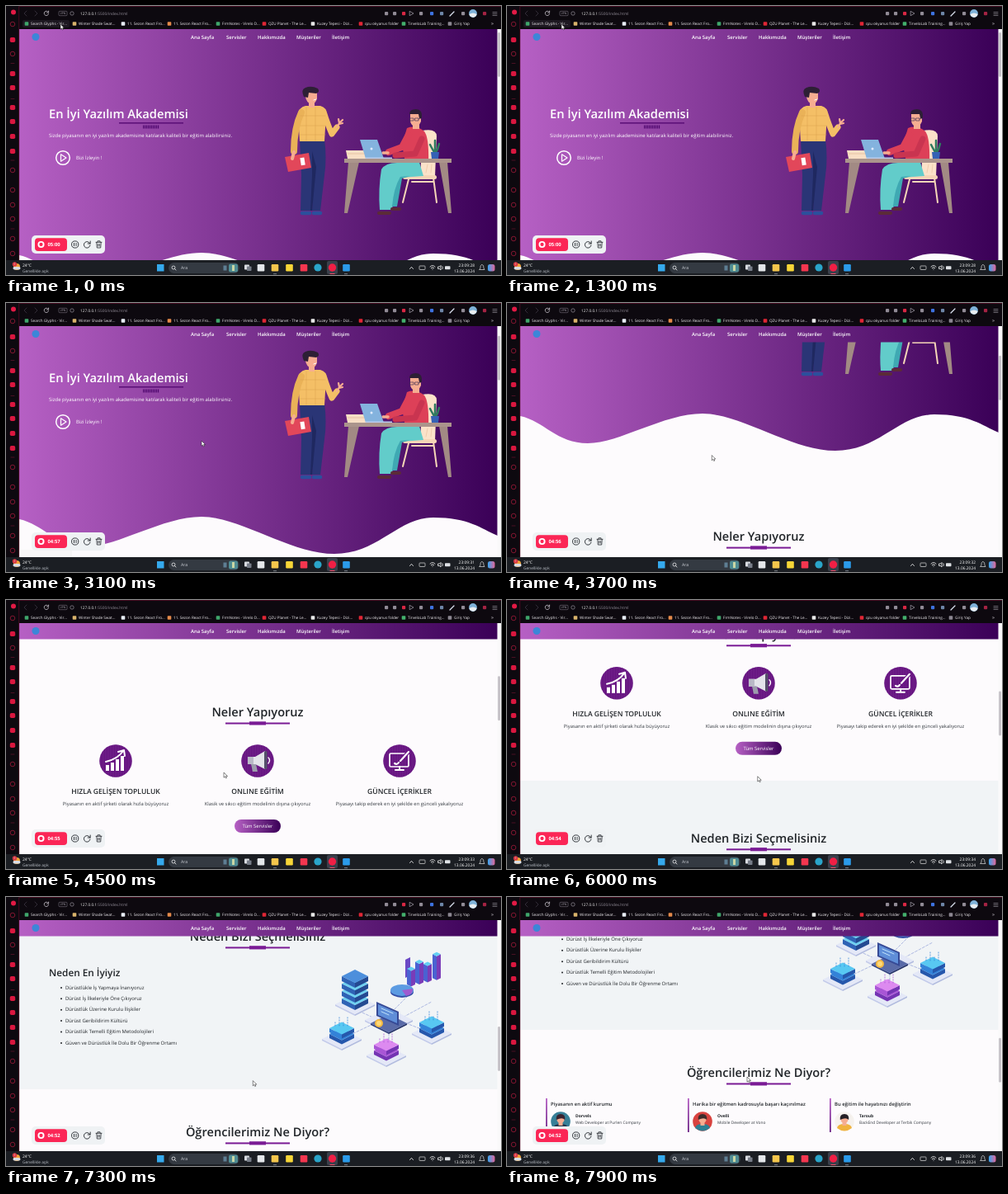
Recreate the animation shown at these times as an HTML page. Size 600 px wide and 326 px high, loop 8 s.

```html
<!DOCTYPE html>
<html lang="tr">
<head>
<meta charset="utf-8">
<style>
html, body { margin: 0; width: 100%; height: 100%; overflow: hidden; background: #fdfbfd }
svg { display: block; width: 100%; height: 100%; font-family: "Open Sans", "Noto Sans", sans-serif; text-rendering: geometricPrecision }
</style>
</head>
<body>
<svg id="stage" viewBox="0 0 600 326"></svg>
<script>
// Drawing helpers: each returns SVG markup
const text = (x, y, size, str, fill = '#fff', extra = '') =>
  `<text x="${x}" y="${y + size * .36}" font-size="${size}" fill="${fill}" ${extra}>${str}</text>`;
const rect = (x, y, w, h, fill, r = 0, extra = '') =>
  `<rect x="${x}" y="${y}" width="${w}" height="${h}" rx="${r}" fill="${fill}" ${extra}/>`;
const dot = (x, y, r, fill, extra = '') => `<circle cx="${x}" cy="${y}" r="${r}" fill="${fill}" ${extra}/>`;
const shape = (d, fill) => `<path d="${d}" fill="${fill}"/>`;
const line = (d, stroke, width = 1, extra = '') =>
  `<path d="${d}" fill="none" stroke="${stroke}" stroke-width="${width}" stroke-linecap="round" stroke-linejoin="round" ${extra}/>`;
const at = (x, y, body) => `<g transform="translate(${x} ${y})">${body}</g>`;
const mid = 'text-anchor="middle"', semi = 'font-weight="600"';
const ink = '#212529', violet = '#7a1b95', skin = '#f6ad91', hair = '#2d1f35';

const heading = (y, str) => text(305, y, 14.6, str, ink, `${mid} ${semi}`) +
  rect(266, y + 12.5, 78, 2, violet) + rect(295, y + 11.3, 20, 4.2, violet);

const standingMan = () =>
  shape('M356 161H386Q389 185 386 205L381 248H371L373 200L370 248H357L358 205Z', '#2a3576') +
  shape('M371 176L376 195L371 248L369 248L371 205Z', '#1f2860') +
  line('M359 251H368M373 251H381', '#2c4f9c', 4.5) +
  shape('M363 121Q355 122 354 133L356 164H386L388 131Q389 123 381 121Z', '#f4bf66') +
  line('M358 129Q349 148 349 176', '#eab258', 8) +
  line('M385 128Q390 144 395 155L401 147', '#f4bf66', 7) + line('M401 147L404 142L408 138M404 142L403 137M404 143L408 142', skin, 2.2) +
  line('M357 133H387M357 145H387M357 156H387M364 123V163M375 123V163', '#d79b4b', .4) +
  rect(367, 112, 7, 11, skin) + shape('M363 103H377V112Q375 119 370 119Q364 117 363 110Z', skin) +
  shape('M361 110Q357 101 363 99Q370 96 378 100Q381 104 376 106L367 105L366 111Z', hair) +
  line('M373 114L376 113', '#fff', 1) +
  shape('M338 183L367 178L370 196L342 201Z', '#e2475a') + rect(357, 184, 5, 9, '#fff', 0, 'transform="rotate(-9 359 188)"') +
  line('M349 177L347 185', skin, 4);

const sittingMan = () =>
  line('M488 210L481 238M518 208L522 238M492 213H518', '#f5d5b7', 2) +
  shape('M505 151Q522 148 522 158L520 207L502 207Z', '#fbe2c9') + line('M511 192L509 202M516 192L515 202', '#ecc7a6', .8) +
  rect(481, 205, 41, 5, '#f5d5b7', 2.5) +
  shape('M500 186L506 206L478 208Q470 228 468 247H453Q451 222 455 198Q460 190 474 190Z', '#62ccca') +
  shape('M490 206L480 209Q476 232 474 243H468Q470 220 478 207Z', '#3fa9b3') +
  line('M452 251H465M468 246H477', '#5b2b38', 4) +
  shape('M486 148Q496 144 506 151Q513 157 512 190H484L480 168Z', '#dd4058') +
  line('M488 156L480 171L464 177', '#dd4058', 8) + line('M504 161L496 179L472 181', '#c93450', 7) +
  line('M457 178L463 178', skin, 3.5) +
  rect(493, 139, 8, 10, skin) + shape('M490 130H503V140Q500 147 495 146Q490 144 490 138Z', skin) +
  shape('M489 131Q489 125 497 125Q505 125 504 136L501 136L500 131Z', hair) +
  line('M490 136H494V139H490ZM496 136H500V139H496ZM500 137L503 136', '#423052', .7) +
  line('M520 179Q516 172 514 168M520 179V163M520 179Q524 173 525 167', '#2f7a5f', 2.5) + shape('M515 177H525L524 185H516Z', '#3561b5') +
  shape('M412 175H440L444 185H414Z', '#f8dfc5') + line('M414 179H441', '#deb994', .7) +
  shape('M429 162H450L458 185H436Z', '#84b3de') + rect(436, 183.5, 32, 1.8, '#b9cbed') + dot(443, 173, 1.5, '#dfeaff') +
  shape('M415 189H428L414 251H410ZM525 189H535L540 251H536Z', '#a28a84') +
  rect(410, 185, 130, 5, '#ab948c');

const hero = () =>
  rect(16, 28, 580, 325, 'url(#brand)') + standingMan() + sittingMan() +
  text(52, 131, 14.7, 'En İyi Yazılım Akademisi', '#fff', semi) +
  rect(137, 141, 78, 1.6, '#5d1179') + rect(166, 144.5, 20, 4, 'url(#hatch)') +
  text(52, 157, 5.95, 'Sizde piyasanın en iyi yazılım akademisine katılarak kaliteli bir eğitim alabilirsiniz.') +
  dot(69, 184, 8.3, 'none', 'stroke="#fff" stroke-width="1.5"') + line('M66.5 179.8L73 184L66.5 188.2Z', '#fff', 1.2) +
  text(85, 184, 5.9, 'Bizi İzleyin !') +
  shape('M16 302C45 308 60 335 98 335S190 299 237 299S345 344 398 344S475 300 518 300S575 313 596 322V355H16Z', '#fdfbfd');

const service = (x, title, info, icon) => at(x, 507,
  dot(0, 0, 19.7, '#691583') + dot(0, 0, 19.7, 'url(#hatch)', 'opacity=".35"') + icon +
  text(0, 37, 8.6, title, ink, `${mid} ${semi}`) + text(0, 52, 5.85, info, '#343a40', mid));

const services = () => heading(448, 'Neler Yapıyoruz') +
  service(133, 'HIZLA GELİŞEN TOPLULUK', 'Piyasanın en aktif şirketi olarak hızla büyüyoruz',
    rect(-12, 5, 4, 7, '#fff') + rect(-6, 2, 4, 10, '#fff') + rect(0, -2, 4, 14, '#fff') + rect(6, -6, 4, 18, '#fff') +
    line('M-12 1Q2 -2 9 -12M3 -11L10 -13L11 -6', '#fff', 2)) +
  service(305, 'ONLINE EĞİTİM', 'Klasik ve sıkıcı eğitim modelinin dışına çıkıyoruz',
    shape('M-12 -5L-3 -5L9 -12V10L-3 4H-12Z', '#e4e4ea') + shape('M-8 4H-2L0 13H-6Z', '#9c9cac') +
    shape('M-12 -5H-5V4H-12Z', '#b9b9c6') + rect(8, -12, 3.5, 22, '#55506a', 1.5) + line('M13 -4Q16 -1 13 3', '#fff', 1.4)) +
  service(477, 'GÜNCEL İÇERİKLER', 'Piyasayı takip ederek en iyi şekilde en günceli yakalıyoruz',
    rect(-12, -9, 23, 16, 'none', 1.5, 'stroke="#fff" stroke-width="1.7"') + line('M-5 11H5M0 7V11', '#fff', 2) +
    line('M11 -11L1 0', '#691583', 4.5) + line('M11 -11L1 0M-1 2Q-3 5 -6 3', '#fff', 2.2)) +
  rect(277, 578, 56, 16, 'url(#brand2)', 8) + text(305, 586, 5.9, 'Tüm Servisler', '#fff', mid);

// Isometric diamond slab of half width w and height h
const slab = (x, y, w, h, top, side, dark) => at(x, y,
  shape(`M${-w} 0L0 ${w / 2}V${w / 2 + h}L${-w} ${h}Z`, side) + shape(`M${w} 0L0 ${w / 2}V${w / 2 + h}L${w} ${h}Z`, dark) +
  shape(`M${-w} 0L0 ${-w / 2}L${w} 0L0 ${w / 2}Z`, top));
const base = (x, y, w = 24) => slab(x, y, w, 2, '#e4e8f7', '#c3cbea', '#b2bcdf');
const chip = (x, y, top, side, dark) => base(x, y + 8) + slab(x, y + 2, 15, 5, side, dark, dark) + slab(x, y - 5, 15, 5, top, side, dark) +
  [-8, -3, 2, 7].map((dx, i) => line(`M${x + dx} ${y - 8}V${y - 14 - i % 2 * 5}`, side, .8, 'stroke-dasharray="1 2"')).join('');
const blue = ['#58c8f2', '#3382d8', '#2657ac'];

const network = () =>
  line('M423 783L464 802L516 774M407 819L464 792L516 812M464 802V836M464 790L490 764', '#aeb9e2', 1, 'stroke-dasharray="3 2"') +
  base(423, 777) + [770, 761, 752, 743].map(y => slab(423, y, 16, 6, y < 745 ? '#4d8fdc' : '#6fd0f0', '#2f63b5', '#244a92')).join('') +
  at(485, 732, shape('M-1 -9L5 -12V10L-1 13Z', '#6b49c5') + [[0, 15], [10, 21], [20, 16], [31, 25]].map(([x, h]) =>
    slab(x + 6, 17 - x / 4 - h, 5, h + 4, '#62d0f3', '#4a62d2', '#7a3cb8')).join('')) +
  at(480, 762, `<ellipse rx="14" ry="7" fill="#3550a8"/><ellipse cy="-2" rx="14" ry="7" fill="#5c9be2"/>` + shape('M0 -2L13 -4Q14 3 5 5Z', '#9e5bd0')) +
  base(464, 796, 29) + slab(464, 800, 22, 2, '#5a6ba8', '#31427d', '#283568') +
  shape('M449 774L476 786V803L449 791Z', '#364a96') + shape('M451 777L474 787V800L451 790Z', '#5f8ed8') +
  line('M455 782L469 788M455 786L464 790', '#bfe3fb', 1) + dot(452, 800, 5, '#f4b942') + dot(452, 800, 3, '#ffd978') +
  chip(407, 811, ...blue) + chip(516, 804, ...blue) + chip(461, 831, '#dd8af0', '#a956d6', '#7434b3');

const why = () => rect(16, 625, 580, 255, '#f1f4f6') + heading(695, 'Neden Bizi Seçmelisiniz') +
  text(52, 739, 11.8, 'Neden En İyiyiz', ink, semi) +
  ['Dürüstlükle İş Yapmaya İnanıyoruz', 'Dürüst İş İlkeleriyle Öne Çıkıyoruz', 'Dürüstlük Üzerine Kurulu İlişkiler',
    'Dürüst Geribildirim Kültürü', 'Dürüstlük Temelli Eğitim Metodolojileri', 'Güven ve Dürüstlük İle Dolu Bir Öğrenme Ortamı']
    .map((s, i) => dot(67, 757 + i * 13.4, 1, ink) + text(72, 756.5 + i * 13.4, 5.95, s, ink)).join('') + network();

const quote = (x, title, name, job, back, shirt, hairColor) => at(x, 963,
  rect(0, 0, 1.8, 41, 'url(#brandV)') + text(6, 6.5, 5.9, title, ink, semi) +
  dot(18, 28, 11.8, back) + shape('M9 36Q10 31 18 31T27 36Q18 43 9 36Z', shirt) + rect(15.5, 28, 5, 5, skin) +
  dot(18, 25.5, 4.6, skin) + shape('M12.8 26Q12 19 18 19T23.2 26Q20 22.5 12.8 26Z', hairColor) +
  text(36, 21.5, 5, name, ink, 'font-weight="700"') + text(36, 29.5, 4.85, job, '#343a40'));

const quotes = () => heading(932, 'Öğrencilerimiz Ne Diyor?') +
  quote(47, 'Piyasanın en aktif kurumu', 'Dorvels', 'Web Developer at Purlen Company', '#377f97', '#24364e', '#3a2430') +
  quote(219, 'Harika bir eğitmen kadrosuyla başarı kaçınılmaz', 'Ovelli', 'Mobile Developer at Vono', '#d8433f', '#2e7f93', '#3e2b2b') +
  quote(391, 'Bu eğitim ile hayatınızı değiştirin', 'Taroub', 'BackEnd Developer at Terbik Company', '#f6f2ee', '#f0b33f', '#252026');

const navbar = () => rect(16, 28, 580, 19.5, 'url(#brand)') + dot(36, 37.5, 4.5, '#3c86d8') +
  [[224, 'Ana Sayfa'], [267, 'Servisler'], [305, 'Hakkımızda'], [352, 'Müşteriler'], [395, 'İletişim']]
    .map(([x, s]) => text(x, 38, 5.95, s, '#fff', semi)).join('');

const bookmarks = [[25, 'Search Glyphs - Vir...', '#3fa66b'], [83, 'Winter Shade Swat...', '#d9b36b'], [142, '11. Sezon React Fro...', '#e8edf5'],
  [198, '11. Sezon React Fro...', '#e58a4a'], [257, 'FrmNotes - Virelo D...', '#3fa66b'], [313, 'QZU Planet - The Le...', '#e02635'],
  [372, 'Kuzey Tepesi - Dizi...', '#e8e8e8'], [430, 'qzu okyanus folder', '#e02635'], [482, 'TirveloLab Training...', '#43b06c'], [538, 'Giriş Yap', '#8c8792']];

const browser = () => rect(0, 0, 600, 28, '#0d090f') + rect(0, 0, 16, 308, '#0d090f') +
  line('M15.7 308V.5H600', '#5c0c27', .7) +
  line('M25 6L22 9L25 12M35 6L38 9L35 12', '#3d3743', .8) + line('M51.3 7.5A2.7 2.7 0 1 0 51.6 9.5M51.6 6V8H49.6', '#c9c4cd', .8) +
  rect(64, 6.3, 10, 5.4, 'none', 1, 'stroke="#8b8590" stroke-width=".5"') + text(69, 9, 3.4, 'VPN', '#aaa4af', mid) +
  dot(80, 9, 2.2, 'none', 'stroke="#aaa4af" stroke-width=".6"') +
  text(90, 9, 4.75, '127.0.0.1<tspan fill="#918b96">:5500/index.html</tspan>', '#eee') +
  [[461, '#918b96'], [471, '#918b96'], [482, '#d92743'], [503, '#918b96'], [516, '#3d72e0'], [528, '#6e86a8'], [554, '#918b96'], [580, '#a52343']]
    .map(([x, c]) => rect(x - 2, 7, 4.2, 4.2, c, 1)).join('') +
  line('M489.5 6.5L494 9L489.5 11.5Z', '#aaa4af', .7) + line('M538 12L543 7', '#d9e0ee', 1.3) + line('M590 7.5H595M590 9.5H595M590 11.5H595', '#aaa4af', .6) +
  dot(566, 9, 4.9, '#7fb2d8') + shape('M561.5 10Q566 7 570.6 10Q569 14 566 13.7Q562 13 561.5 10Z', '#e9edf0') +
  rect(20, 17, 57, 9, '#1d1821', 2, 'id="hover"') +
  bookmarks.map(([x, s, c]) => rect(x - 2.3, 19.2, 4.6, 4.6, c, .8) + text(x + 5, 21.5, 4.65, s, '#f4f1f5')).join('') +
  text(588, 21, 6, '»', '#c9c4cd') +
  [[22, 0], [41, 1], [58, 0], [82, 1], [99, 1], [123, 1], [140, 1], [158, 1], [176, 1], [199, 0], [223, 0], [241, 0], [258, 0], [282, 0], [300, 0]]
    .map(([y, solid]) => solid ? rect(4.8, y - 3, 6.4, 6, '#d9173f', 1.8) : dot(8, y, 2.8, 'none', 'stroke="#8f1835" stroke-width=".9"')).join('') +
  dot(9, 7.5, 3, '#e21a45') + line('M6 69.5H10M6 112.5H10M6 187H10M6 270H10', '#5a1229', .8);

const recorder = () => rect(31, 278, 89, 22, '#eff2f4', 5) + rect(35, 281.3, 39, 15.6, '#fb2656', 4) +
  dot(42.5, 289, 3.1, 'none', 'stroke="#fff" stroke-width="1.9"') +
  text(50.5, 289, 5.9, '', '#fff', 'id="timer" font-weight="700"') +
  dot(83.7, 289, 4.1, 'none', 'stroke="#20242a" stroke-width=".9"') + line('M82.5 287.4V290.6M85 287.4V290.6', '#20242a', .9) +
  line('M101.8 288A3.8 3.8 0 1 0 102 290M102.2 285V288H99.2', '#20242a', .9) +
  line('M109 286.3H116M111 286V284.8H114V286M109.8 286.5L110.3 293H114.7L115.2 286.5M111.7 288.5V291M113.3 288.5V291', '#20242a', .8);

const taskbar = () => rect(0, 308, 600, 18, '#1b1e23') +
  dot(13, 316, 4, '#f0a43a') + rect(8.5, 316, 9, 3.5, '#d8dde5', 1.7) + dot(10.5, 313, 2.7, '#d83a46') + text(10.5, 313, 3.5, '1', '#fff', mid) +
  text(20, 314, 5, '24°C') + text(20, 320.8, 4.8, 'Genellikle açık', '#bfc4cc') +
  rect(183, 313, 8.5, 8.5, '#35a9ec') +
  rect(197, 311, 86, 13, '#343a42', 6.5) + dot(203, 317, 2, 'none', 'stroke="#fff" stroke-width=".7"') + line('M204.6 318.6L206 320', '#fff', .8) +
  text(212, 317.5, 5.2, 'Ara', '#c9cdd4') + rect(270, 312.5, 11, 10, '#4f8c93', 2) + rect(274, 314, 3, 7, '#c9d6a4') + rect(263.5, 314.5, 4, 6, '#5e7e93') +
  rect(289, 313.5, 6, 6, '#d8dbe0', .8) + rect(292, 315.5, 5.5, 5.5, '#777d88', .8) +
  [[309, '#e4e7ea'], [326, '#f5c64c'], [343.5, '#f7d637'], [361, '#f4364f'], [412.5, '#2b9bea']].map(([x, c]) => rect(x - 4.3, 313, 8.6, 8.4, c, 1.2)).join('') +
  dot(378, 317, 4.6, '#2aa5c9') + rect(389, 309, 13, 16, '#3a404b', 2) + dot(395.5, 317, 4.7, '#f01f45') +
  rect(392.5, 324, 6, 1, '#f04a68') + rect(324, 324.3, 4, .8, '#8a919c') + rect(410, 324.3, 4, .8, '#8a919c') +
  line('M489.5 318.5L491.5 316.3L493.5 318.5', '#fff', .8) + rect(501, 315, 7, 4.5, 'none', .8, 'stroke="#ddd" stroke-width=".7"') +
  line('M514 316Q517 313 520 316M515.3 317.6Q517 316 518.7 317.6M517 319.2V319.3M524 316H525.5L527 314.5V320L525.5 318.5H524ZM529 315.7Q530 317.2 529 318.7', '#fff', .8) +
  rect(532, 315.2, 6.5, 4, '#dfe2e6', .8) +
  text(568, 314, 4.9, '', '#fff', 'id="clock" text-anchor="end"') + text(568, 320.8, 4.9, '13.06.2024', '#fff', 'text-anchor="end"') +
  line('M574 319.5H580L579 317.5Q579.2 313.5 577 313.5T575 317.5Z', '#ddd', .7) + rect(584, 313, 8.5, 8.5, 'url(#assist)', 2.5);

const gradient = (id, from, to, dir = '') =>
  `<linearGradient id="${id}" ${dir}><stop stop-color="${from}"/><stop offset="1" stop-color="${to}"/></linearGradient>`;

const stage = document.getElementById('stage');
stage.innerHTML = `<defs>
  ${gradient('brand', '#b660c4', '#3a0057', 'gradientUnits="userSpaceOnUse" x1="16" x2="596"')}
  ${gradient('brand2', '#b660c4', '#3a0057')}
  ${gradient('brandV', '#b660c4', '#6a2184', 'x2="0" y2="1"')}
  ${gradient('assist', '#38a6f0', '#e2679b')}
  <pattern id="hatch" width="2" height="2" patternUnits="userSpaceOnUse">${rect(0, 0, 2, 2, '#8d3ca5') + rect(0, 0, 1.1, 2, '#4f0a6c')}</pattern>
  <clipPath id="view">${rect(16, 28, 584, 280, '#000')}</clipPath></defs>
  <g clip-path="url(#view)">${rect(16, 28, 584, 280, '#fdfbfd')}
    <g id="page">${hero() + services() + why() + quotes()}</g>
    ${navbar() + rect(595.5, 28, 4.5, 280, '#faf9fa') + rect(596.2, 32, 2.8, 54, '#c4c0c6', 1.4, 'id="thumb"')}
  </g>` + browser() + rect(16, 299, 64, 9, '#eee', 0, 'id="status" opacity=".4"') + recorder() + taskbar() +
  `<path id="cursor" d="M0 0V6.2L1.5 4.9L2.5 7L3.5 6.5L2.6 4.5H4.5Z" fill="#fff" stroke="#111" stroke-width=".5"/>`;

// Keyframes are [time, value, ...]; values are interpolated linearly
const scrollKeys = [[0, 0], [2400, 0], [2900, 40], [3150, 40], [4350, 312], [4700, 312], [6000, 406], [6600, 523], [7600, 700], [7900, 719], [8000, 722]];
const cursorKeys = [[0, 66, 22], [1500, 66, 22], [2300, 237, 167], [3200, 237, 167], [4400, 264, 209], [4800, 264, 209],
  [5800, 302, 209], [6600, 309, 228], [7900, 291, 218], [8000, 291, 218]];

function sample(keys, t) {
  const i = Math.max(1, keys.findIndex(k => k[0] > t));
  const a = keys[i - 1], b = keys[i], p = (t - a[0]) / (b[0] - a[0]);
  return a.slice(1).map((v, j) => v + (b[j + 1] - v) * p);
}

const el = id => document.getElementById(id);
function draw() {
  const t = performance.now() % 8000;
  const [scroll] = sample(scrollKeys, t), [x, y] = sample(cursorKeys, t);
  const sec = t < 1400 ? 28 : t < 1600 ? 29 : Math.floor(28.7 + t / 1000);
  el('page').setAttribute('transform', `translate(0 ${-scroll})`);
  el('thumb').setAttribute('y', 32 + scroll * .193);
  el('cursor').setAttribute('transform', `translate(${x} ${y})`);
  el('hover').style.display = t < 1550 ? '' : 'none';
  el('status').style.display = t > 2900 && t < 3200 ? '' : 'none';
  el('timer').textContent = sec < 29 ? '05:00' : '04:' + (88 - sec);
  el('clock').textContent = '23:09:' + sec;
  requestAnimationFrame(draw);
}
draw();
</script>
</body>
</html>
```
